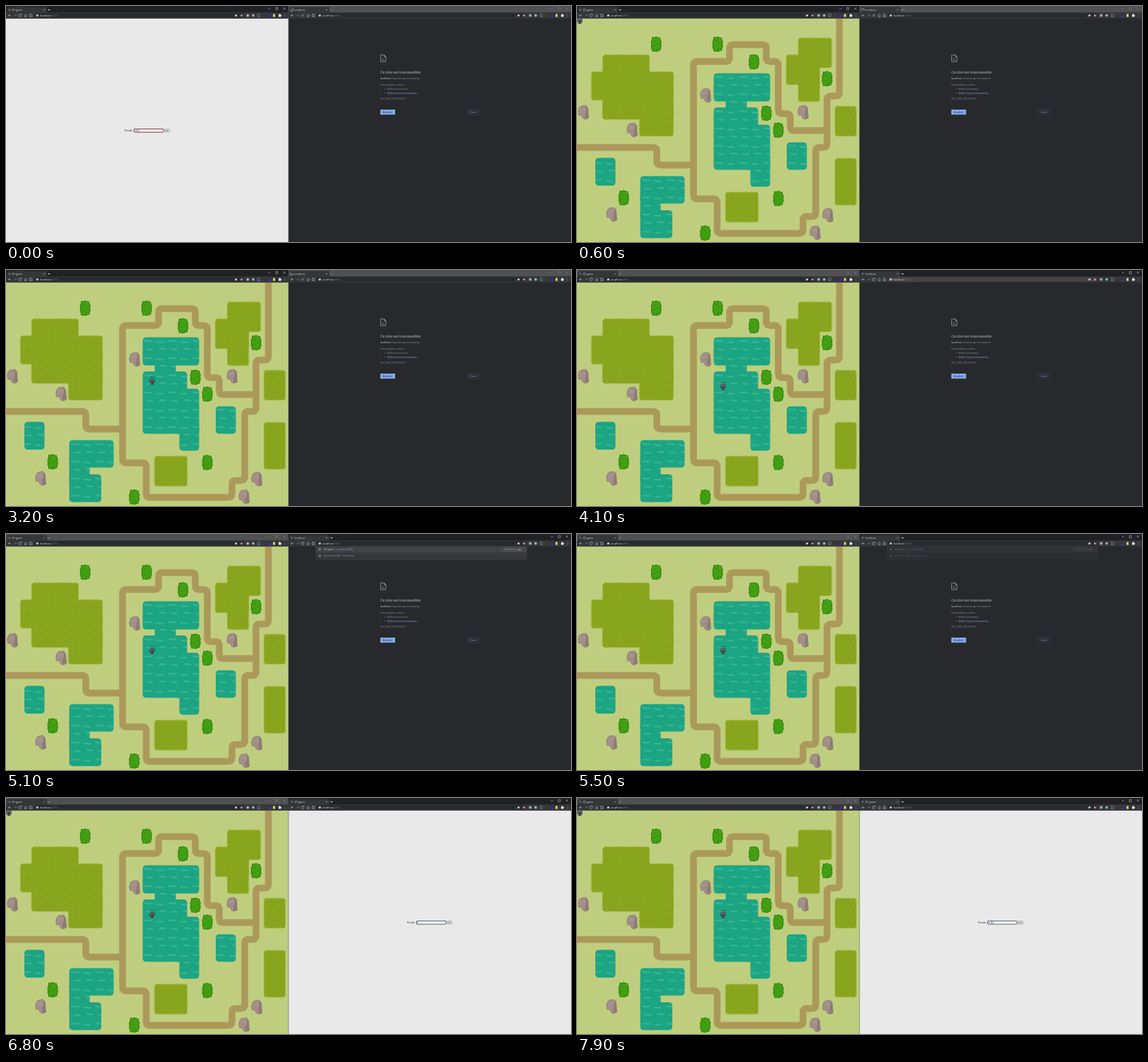
An HTML page for the animation above (8000 ms loop, 800 by 335 pixels).

```html
<!DOCTYPE html>
<html lang="fr">
<head>
<meta charset="utf-8">
<title>2D game</title>
<style>
html, body { margin: 0; width: 100%; height: 100%; overflow: hidden; background: #28292c; }
svg { display: block; width: 100%; height: 100%; }
text { font-family: "Open Sans", "Noto Sans", sans-serif; white-space: pre; }
.serif { font-family: "Liberation Serif", serif; }
</style>
</head>
<body>
<svg id="stage" viewBox="0 0 800 335" preserveAspectRatio="none">
  <defs>
    <clipPath id="page"><rect y="17.5" width="400" height="317.5"/></clipPath>
    <pattern id="waves" width="34.4" height="24.4" patternUnits="userSpaceOnUse" x="194" y="95">
      <rect width="35" height="25" fill="#1ca583"/>
      <path d="M1.500 6l1.700-1 1.900 1.500 2-1.400 2 1.500 2-1.400 1.900 1M19 7.600l1.700-1 1.900 1.500 2-1.400 2 1.400 2-1M5 18l1.700-1 1.900 1.500 2-1.400 2 1.400 2-1M23 17l1.600-1 1.900 1.400 2-1.400 2 1.500 1.900-1"
        fill="none" stroke="#74d0b2" stroke-width=".75"/>
    </pattern>
    <pattern id="grass" width="17.2" height="12.2" patternUnits="userSpaceOnUse" x="20" y="69">
      <rect width="18" height="13" fill="#89a51d"/>
      <path d="M2 5l1 2 1-2M9 3l1 2 1-2M12 9l1 2 1-2" fill="none" stroke="#7b9a17" stroke-width=".8"/>
      <circle cx="6.500" cy="3" r=".6" fill="#b0a72c"/>
    </pattern>
    <g id="bush">
      <path d="M-5-9.500l2.500.500 2.500-1.200 3 1.200 2.500.500.500 3 1.200 2.500-.700 3 .700 3-1 3-.700 3-2.500.500-2.500 1.200-2.500-1-3 .300-.700-3-1.200-3 .700-3-.700-3 1-3Z"
        fill="#43a012" stroke="#2f850f" stroke-width="1.200"/>
      <path d="M-4-5l2 1.500 2-1.500M1-1l2 1.500 2-1.500M-5 2l2 1.500 2-1.500M0 6l2 1.500 2-1.500" fill="none" stroke="#378e10" stroke-width=".9"/>
    </g>
    <g id="rock">
      <path d="M-4.500-8.500l3.500-1 4.500-.500 3 4 .500 8 .500 6-5 2-3.500-2-1-3.500-4.500-.500-.800-5 .800-4Z" fill="#a28f89" stroke="#8a7873" stroke-width=".7"/>
      <path d="M3.500-10l3 4 .500 8 .500 6-5 2-.500-7 2-6Z" fill="#8e7c77"/>
      <path d="M-5-4l4 1 4-2" fill="none" stroke="#b3a19a" stroke-width=".7"/>
    </g>
    <g id="hero">
      <path d="M-3.800-2l1.300-2h5l1.300 2L3.400 2 1.800 4.200h-3.600L-3.400 2Z" fill="#2c3231"/>
      <path d="M-2.800-2.200h5.600M-2.900 2l2 .900M2.900 2l-2 .900M-2.700 0h1.800M.9 0h1.800" fill="none" stroke="#b3beb3" stroke-width=".9"/>
    </g>
  </defs>
</svg>
<script>
const NS = "http://www.w3.org/2000/svg";
const LOOP = 8000;
const stage = document.getElementById("stage");

function el(parent, tag, attrs = {}, content) {
  const node = document.createElementNS(NS, tag);
  for (const key in attrs) node.setAttribute(key, attrs[key]);
  if (content !== undefined) node.textContent = content;
  parent.appendChild(node);
  return node;
}
const group = (parent, attrs) => el(parent, "g", attrs);
const rect = (parent, x, y, width, height, fill, more) => el(parent, "rect", { x, y, width, height, fill, ...more });
const line = (parent, d, stroke, width = .8, more) =>
  el(parent, "path", { d, stroke, fill: "none", "stroke-width": width, ...more });
const dot = (parent, cx, cy, r, fill) => el(parent, "circle", { cx, cy, r, fill });
const text = (parent, x, y, size, fill, content, more) =>
  el(parent, "text", { x, y, "font-size": size, fill, ...more }, content);
const show = (node, on) => node.setAttribute("visibility", on ? "inherit" : "hidden");

// Browser windows
function makeWindow(x) {
  const root = group(stage, { transform: `translate(${x})` });
  const page = group(root, { "clip-path": "url(#page)" });
  const strip = rect(root, 0, 0, 400, 9.5, "#202124");
  rect(root, 1.5, 1.2, 56.5, 9, "#35363a", { rx: 1.5 });
  rect(root, 0, 9, 400, 8.7, "#35363a");
  const address = rect(root, 40, 10.2, 296, 6.4, "#292a2d", { rx: 3 });
  const favicon = dot(root, 4.6, 5.4, 1.4, "#66696d");
  const spinner = line(root, "M4.6 3.600a1.900 1.900 0 1 1 -1.900 1.900", "#c8cbd0", .7);
  const title = text(root, 8.3, 6.8, 3.6, "#d2d3d6", "2D game");
  line(root, "M53 4.500l2 2m0-2l-2 2", "#c4c5c7", .5);
  const controls = group(root);
  line(controls, "M59.500 5.500h3M61 4v3", "#e2e2e2", .6);
  line(controls, "M371.500 4h3M382 2.300h3v3h-3ZM392.700 2.200l3 3m0-3l-3 3", "#d8d8d8", .5);

  line(root, "M7 13.400H3.500m1.600-1.600l-1.600 1.600 1.600 1.600", "#bcbec2", .6);
  line(root, "M11.500 13.400H15m-1.600-1.600l1.600 1.600-1.600 1.600", "#7a7d81", .6);
  const reload = line(root, "M21.600 12.200a1.900 1.900 0 1 0 .3 2M22 11v1.700h-1.700", "#bcbec2", .6);
  const stop = line(root, "M18.500 11.700l3.400 3.400m0-3.400l-3.400 3.400", "#bcbec2", .6);
  line(root, "M26 13.500l2-1.900 2 1.900M26.700 13.300v2h2.600v-2M33.700 11.600h3v3.900l-1.500-1.200-1.500 1.200Z", "#bcbec2", .6);
  dot(root, 44.3, 13.4, 1.7, "#d4d5d7");
  line(root, "M44.300 12.300v.4m0 .6v1.300", "#292a2d", .5);
  const url = text(root, 48, 14.8, 3.8, "#e0e2e5", "localhost");
  el(url, "tspan", { fill: "#6a6e73" }, ":3000");

  line(root, "M321 11v5M364 11v5", "#4d4f53", .5);
  dot(root, 325.7, 13.4, 1.6, "#b9c4d2");
  dot(root, 333.5, 13.4, 1.6, "#bd8790");
  rect(root, 340.5, 11.7, 3.4, 3.4, "#a9aeb0");
  dot(root, 350, 13.4, 1.8, "#8fbfb4");
  line(root, "M356.300 11.700h3.200v3.700h-3.200Z", "#8b9ca8", .6);
  rect(root, 372, 13, 3.8, 3.5, "#3a2d99");
  rect(root, 378, 11.3, 3, 4.2, "#d7ce5b");
  rect(root, 386, 12.3, 3.2, 3, "#f0f0f0");
  dot(root, 387.6, 11.8, .9, "#f0f0f0");
  dot(root, 389.4, 13.8, .8, "#f0f0f0");
  for (const y of [11.7, 13.4, 15.1]) dot(root, 395, y, .4, "#c0c2c6");

  return {
    page,
    update(active, loading, name) {
      strip.setAttribute("fill", active ? "#202124" : "#505153");
      controls.setAttribute("opacity", active ? 1 : .35);
      title.textContent = name;
      show(reload, !loading);
      show(stop, loading);
    },
    hover: on => address.setAttribute("fill", on ? "#47433f" : "#292a2d"),
    spin(on, time) {
      show(favicon, !on);
      show(spinner, on);
      spinner.setAttribute("transform", `rotate(${time * .36} 4.6 5.5)`);
    }
  };
}

function makeForm(parent, accent) {
  const root = group(parent);
  rect(root, 0, 17.5, 400, 318, "#e9e9e9");
  line(root, "M0 18H400", "#ece0e7", .8);
  const body = group(root);
  text(body, 168, 178.2, 3.8, "#222", "Pseudo :", { class: "serif" });
  rect(body, 181.5, 174.6, 41.5, 4.5, "#fff", { stroke: accent, "stroke-width": .9, rx: .5 });
  const value = text(body, 182.6, 178.1, 3.3, "#222", "");
  const caret = line(body, "M0 175.300v3.200", "#222", .35);
  rect(body, 224.4, 174.8, 7, 4.2, "#efefef", { stroke: "#777", "stroke-width": .5, rx: .6 });
  text(body, 227.9, 178, 3, "#222", "Go!", { "text-anchor": "middle" });
  return {
    root, body,
    type(word) {
      value.textContent = word;
      const end = word ? value.getComputedTextLength() : 0;
      caret.setAttribute("transform", `translate(${183 + end})`);
    }
  };
}

// Game map
function blocks(parent, list, attrs) {
  for (const [x1, y1, x2, y2] of list)
    el(parent, "rect", { x: x1, y: y1, width: x2 - x1, height: y2 - y1, ...attrs });
}

// Polyline with rounded corners
function roundPath(points, radius) {
  const toward = ([x, y], [tx, ty]) => {
    const k = radius / Math.hypot(tx - x, ty - y);
    return [x + (tx - x) * k, y + (ty - y) * k];
  };
  const parts = points.slice(1, -1).map((p, i) =>
    `L${toward(p, points[i])}Q${p} ${toward(p, points[i + 2])}`);
  return `M${points[0]}${parts.join("")}L${points[points.length - 1]}`;
}

function makeMap(parent) {
  const map = group(parent);
  rect(map, 0, 17.5, 400, 318, "#bfce7e");

  const roads = [
    [[371.5, 10], [371.5, 127], [354, 127], [354, 200], [338, 200], [338, 298], [320, 298], [320, 322],
      [198.5, 322], [198.5, 273], [165, 273], [165, 78], [216, 78], [216, 54], [268, 54], [268, 78],
      [285, 78], [285, 152], [302, 152], [302, 176], [354, 176]],
    [[-5, 200], [113, 200], [113, 225], [165, 225]]
  ].map(points => roundPath(points, 5)).join("");
  const shift = { transform: "translate(0 .7)" };
  line(map, roads, "#b3a463", 10, shift);
  line(map, roads, "#aa995a", 8, shift);

  const fields = [
    [37, 70, 102, 160], [21, 94, 136, 133], [37, 115, 136, 160], [89, 140, 136, 184],
    [314, 46, 360, 87], [297, 70, 343, 111], [314, 80, 343, 135],
    [366, 143, 395, 184], [366, 217, 395, 282], [211, 265, 256, 306]
  ];
  blocks(map, fields, { fill: "none", stroke: "#8da922", "stroke-width": 2.4, "stroke-dasharray": "1.7 .8", rx: 3 });
  blocks(map, fields, { fill: "url(#grass)", rx: 3 });

  const lakes = [
    [194, 96, 273, 135], [211, 125, 240, 155], [194, 144.5, 256, 232], [235, 169, 273, 232],
    [246, 215, 273, 256], [26.5, 216, 54, 254.5], [297.5, 194, 325, 232],
    [90, 242, 152, 280], [90, 265, 118, 305], [90, 290.5, 134.5, 329]
  ];
  blocks(map, lakes, { fill: "none", stroke: "#2f9f78", "stroke-width": 1, rx: 4 });
  blocks(map, lakes, { fill: "url(#waves)", rx: 4 });

  const place = (id, spots) => {
    for (const [x, y] of spots) el(map, "use", { href: "#" + id, x, y });
  };
  place("bush", [[112, 54], [199, 54], [250.5, 79], [354, 103], [268, 152], [285, 176], [66, 272], [285, 273], [181.5, 322]]);
  place("rock", [[9, 151], [182, 127], [78, 176], [320, 151], [49, 296], [355, 297], [337, 322]]);
}

function makeHero(parent, name) {
  const root = group(parent);
  el(root, "use", { href: "#hero" });
  text(root, 0, -5.3, 3.2, "#20301f", name, { "text-anchor": "middle" });
  return root;
}

// Connection error page
function makeError(parent) {
  const root = group(parent);
  rect(root, 0, 17.5, 400, 318, "#28292c");
  line(root, "M130.500 69.500h5l2.500 2.500v7h-7.500ZM135.500 69.500v2.500h2.500M132 73.800h.8M135.500 73.800h.8M132.300 77q1.900-1.800 3.800 0", "#a7aaae", .7);
  const grey = "#94979b";
  text(root, 130, 95.6, 5.2, "#a3a6aa", "Ce site est inaccessible", { "font-weight": 600 });
  const reason = text(root, 130, 104.3, 3.2, grey, "");
  el(reason, "tspan", { "font-weight": 700 }, "localhost");
  el(reason, "tspan", {}, " n'autorise pas la connexion.");
  text(root, 130, 113.3, 3.1, grey, "Voici quelques conseils :");
  dot(root, 136.5, 117.8, .5, grey);
  text(root, 139.5, 119, 3.1, grey, "Vérifier la connexion");
  dot(root, 136.5, 123.4, .5, grey);
  text(root, 139.5, 124.6, 3.1, "#8ab4f8", "Vérifier le proxy et le pare-feu");
  text(root, 130, 133, 2.6, "#808388", "ERR_CONNECTION_REFUSED");
  rect(root, 130, 147, 21, 7.2, "#81a8ea", { rx: .8 });
  text(root, 140.5, 151.7, 3, "#202124", "Actualiser", { "text-anchor": "middle" });
  rect(root, 253, 147.2, 16.7, 6.8, "none", { stroke: "#47545a", "stroke-width": .5, rx: .8 });
  text(root, 261.3, 151.7, 3, "#81a8ea", "Détails", { "text-anchor": "middle" });
  return root;
}

function makeSuggestions(parent) {
  const root = group(parent);
  rect(root, 38.5, 17, 299.5, 20, "#35373b");
  rect(root, 38.5, 17, 299.5, 9.5, "#404246");
  dot(root, 44.3, 21.8, 1.5, "#85888c");
  dot(root, 44.3, 30.8, 1.5, "#85888c");
  const first = text(root, 50, 23.1, 3.5, "#bfc1c5", "2D game - ");
  el(first, "tspan", { fill: "#7299d8" }, "localhost:3000");
  text(root, 50, 32.1, 3.5, "#94979b", "localhost:3000 - Recherche");
  rect(root, 301, 19.2, 34, 5.4, "none", { stroke: "#74787d", "stroke-width": .4, rx: 2.5 });
  text(root, 318, 23, 2.9, "#bfc1c5", "Passer à cet onglet", { "text-anchor": "middle" });
  return root;
}

const left = makeWindow(0);
const right = makeWindow(400);
const leftForm = makeForm(left.page, "#6d2530");
leftForm.type("test");
const game = group(left.page);
makeMap(game);
const hero = makeHero(game, "test");
const guest = makeHero(game, "");
guest.setAttribute("transform", "translate(4 21)");
const error = makeError(right.page);
const suggestions = makeSuggestions(right.page);
const rightForm = makeForm(right.page, "#39506e");
line(stage, "M400 0V335", "#46484b", .5);

// Walk: time, x, y
const walk = [
  [1000, 4, 21], [2200, 101, 100], [2750, 176, 142], [3000, 207, 151], [3100, 207, 151], [3300, 207, 166]
];
function heroAt(time) {
  if (time <= walk[0][0]) return walk[0].slice(1);
  for (let i = 1; i < walk.length; i++) {
    const [t0, x0, y0] = walk[i - 1], [t1, x1, y1] = walk[i];
    if (time < t1) {
      const k = (time - t0) / (t1 - t0);
      return [x0 + (x1 - x0) * k, y0 + (y1 - y0) * k];
    }
  }
  return walk[walk.length - 1].slice(1);
}

const pseudo = "milo";
const keyTimes = [7100, 7300, 7500, 7800];

function draw(now) {
  const time = Math.floor(now % LOOP / 100) * 100;
  const rightActive = time >= 3700;
  const loaded = time >= 5600;
  const styled = time >= 5700;
  left.update(!rightActive, false, "2D game");
  left.spin(false, time);
  right.update(rightActive, time < 3700 || (loaded && time < 5800), loaded ? "2D game" : "localhost");
  right.spin(!rightActive, time);
  right.hover(time >= 3900 && time < 5100);

  show(game, time >= 300);
  hero.setAttribute("transform", `translate(${heroAt(time)})`);
  show(guest, styled);

  show(error, !loaded);
  show(suggestions, time >= 5100 && !loaded);
  suggestions.setAttribute("opacity", time < 5500 ? 1 : .4);
  show(rightForm.root, loaded);
  rightForm.body.setAttribute("transform", `translate(0 ${styled ? 0 : -160})`);
  rightForm.body.setAttribute("opacity", styled ? 1 : .6);
  rightForm.type(pseudo.slice(0, keyTimes.filter(t => time >= t).length));
}

const start = performance.now();
function tick() {
  draw(performance.now() - start);
  requestAnimationFrame(tick);
}
tick();
</script>
</body>
</html>
```
